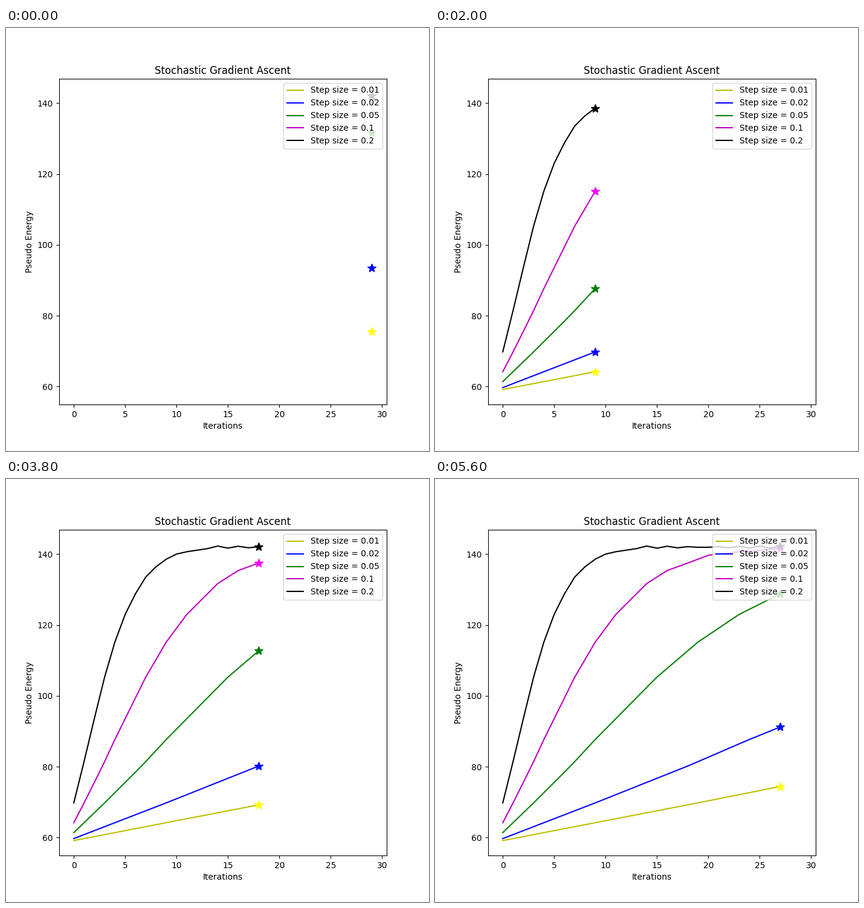
These frames come from a looping animation (700 by 700 pixels, 5.8 s). A matplotlib script:

```python
import matplotlib.pyplot as plt
import numpy as np
from matplotlib.animation import FuncAnimation

STEPS = 29

# step size, line colour, star colour
RUNS = [
    (0.01, "y", "yellow"),
    (0.02, "b", "blue"),
    (0.05, "g", "green"),
    (0.1, "m", "magenta"),
    (0.2, "k", "black"),
]

# every run climbs the same hill: energy depends on the distance walked
WALK = [0, 0.1, 0.2, 0.38, 0.5, 0.8, 1.0, 1.2, 1.5, 1.7, 1.9, 2.1, 2.4, 3.0]
HILL = [58.6, 64.2, 69.8, 80.2, 87.7, 105.3, 115.2, 123.0, 131.7, 135.4,
        137.5, 139.7, 140.7, 142.0]
PEAK = 2.9

its = np.arange(STEPS + 1)


def climb(size):
    """Energy after each iteration, overshooting back and forth at the top."""
    walked = size * (its + 1)
    wobble = 0.3 * np.cos(np.pi * its) * np.cos(np.pi * (its - 14) / 11)
    return np.interp(walked, WALK, HILL) + np.where(walked > PEAK, wobble, 0)


fig, ax = plt.subplots(figsize=(7, 7), dpi=100)
ax.set(xlim=(-1.45, 30.45), ylim=(54.95, 146.9),
       title="Stochastic Gradient Ascent",
       xlabel="Iterations", ylabel="Pseudo Energy")

curves = [climb(size) for size, *_ in RUNS]
lines = [ax.plot([], [], color=color, label=f"Step size = {size}")[0]
         for size, color, _ in RUNS]
stars = [ax.plot([], [], "*", color=color, markersize=10)[0]
         for *_, color in RUNS]
ax.legend(loc="upper right")


def update(count):
    """Draw `count` points; with none drawn, index -1 marks the final energy."""
    for curve, line, star in zip(curves, lines, stars):
        line.set_data(its[:count], curve[:count])
        star.set_data([its[count - 1]], [curve[count - 1]])
    return lines + stars


anim = FuncAnimation(fig, update, frames=STEPS, interval=200,
                     init_func=lambda: update(0), repeat=True, repeat_delay=0)
plt.show()
```
